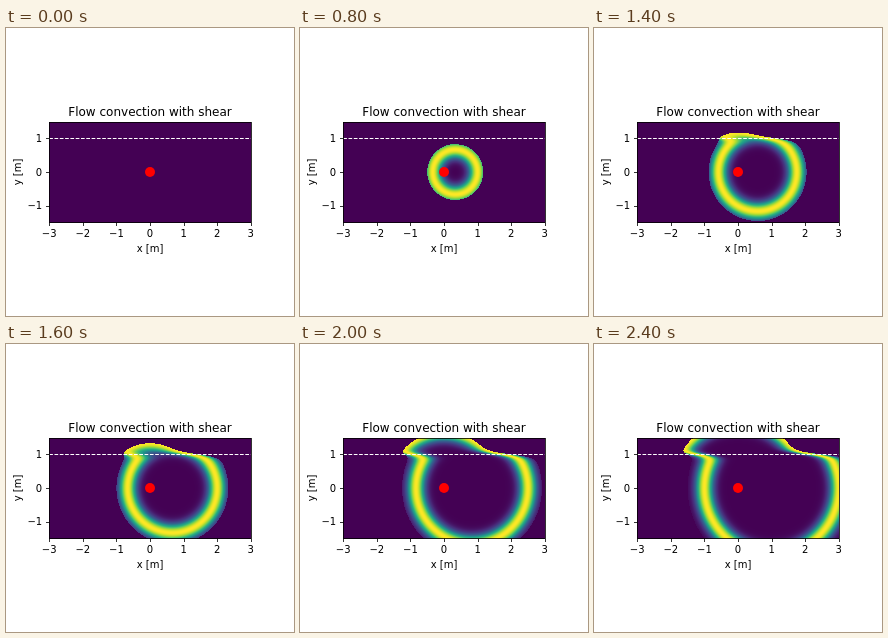
An HTML page with a canvas for the animation above (2.5 s loop, 288x288 px).

```html
<!DOCTYPE html>
<html lang="en">
<head>
<meta charset="utf-8">
<title>Flow convection with shear</title>
<style>
  html, body { margin: 0; width: 288px; height: 288px; overflow: hidden; background: #fff; }
  canvas, svg { position: absolute; display: block; }
  canvas { left: 43px; top: 94px; image-rendering: pixelated; }
  svg { left: 0; top: 0; }
  text { font: 10px "DejaVu Sans", sans-serif; text-anchor: middle; }
  .title { font-size: 12px; }
  .end { text-anchor: end; }
  .axis { fill: none; stroke: #000; stroke-width: .8; }
  .shear { stroke: #fff; stroke-width: 1; stroke-dasharray: 3.7 1.6; }
</style>
</head>
<body>
<canvas id="field" width="202" height="101"></canvas>
<svg id="plot" width="288" height="288" viewBox="0 0 288 288">
  <path class="shear" d="M43.2 110.5H244.8"/>
  <circle cx="144" cy="144" r="5" fill="#f00"/>
  <rect class="axis" x="43.5" y="94.5" width="202" height="100"/>
  <text class="title" x="144" y="88">Flow convection with shear</text>
  <text x="144" y="223.5">x [m]</text>
  <text transform="translate(14.5 144) rotate(-90)">y [m]</text>
</svg>
<script>
  const SCALE = 33.6, ORIGIN = 144, LEFT = 43, TOP = 94;
  const STEP_MS = 100, STEPS = 25;
  const SOUND = 1, FLOW = 0.5, SHEAR_Y = 1, SHEAR_WIDTH = 0.1, PULSE = 0.07;
  const VIRIDIS = [
    [68, 1, 84], [72, 40, 120], [62, 74, 137], [49, 104, 142], [33, 145, 140],
    [40, 174, 128], [94, 201, 98], [173, 220, 48], [253, 231, 37]
  ];

  const plot = document.getElementById('plot');
  const canvas = document.getElementById('field');
  const ctx = canvas.getContext('2d');
  const image = ctx.createImageData(canvas.width, canvas.height);

  function add(tag, attrs, text = '') {
    const el = document.createElementNS('http://www.w3.org/2000/svg', tag);
    for (const name in attrs) el.setAttribute(name, attrs[name]);
    el.textContent = text;
    plot.append(el);
  }

  const label = n => String(n).replace('-', '\u2212');
  const snap = v => Math.floor(v + 0.5) + 0.5;

  function drawTicks() {
    for (let n = -3; n <= 3; n++) {
      const x = ORIGIN + n * SCALE;
      add('path', { class: 'axis', d: `M${snap(x)} 194.5v3.5` });
      add('text', { x, y: 209 }, label(n));
    }
    for (let n = -1; n <= 1; n++) {
      const y = ORIGIN - n * SCALE;
      add('path', { class: 'axis', d: `M43.5 ${snap(y)}h-3.5` });
      add('text', { class: 'end', x: 36.2, y: y + 3.8 }, label(n));
    }
  }

  function colour(v, i) {
    const s = v * (VIRIDIS.length - 1);
    const j = Math.min(Math.floor(s), VIRIDIS.length - 2);
    for (let c = 0; c < 3; c++) {
      image.data[i + c] = VIRIDIS[j][c] + (VIRIDIS[j + 1][c] - VIRIDIS[j][c]) * (s - j);
    }
    image.data[i + 3] = 255;
  }

  // A Gaussian ring carried by each row's flow speed, cut off ahead of the front.
  function drawField(t) {
    let i = 0;
    for (let row = 0; row < canvas.height; row++) {
      const y = (ORIGIN - TOP - row - 0.5) / SCALE;
      const u = FLOW / 2 * (1 - Math.tanh((y - SHEAR_Y) / SHEAR_WIDTH));
      const limit = (SOUND + u / 2) * t;
      for (let col = 0; col < canvas.width; col++, i += 4) {
        const x = (LEFT + col + 0.5 - ORIGIN) / SCALE;
        const r = Math.hypot(x - u * t, y);
        const d = r - SOUND * t;
        colour(r < limit ? Math.exp(-d * d / PULSE) : 0, i);
      }
    }
    ctx.putImageData(image, 0, 0);
  }

  let shown = -1;
  function tick(now) {
    const step = Math.floor(now / STEP_MS) % STEPS;
    if (step !== shown) {
      shown = step;
      drawField(step / 12);
    }
    requestAnimationFrame(tick);
  }

  drawTicks();
  tick(performance.now());
</script>
</body>
</html>
```
